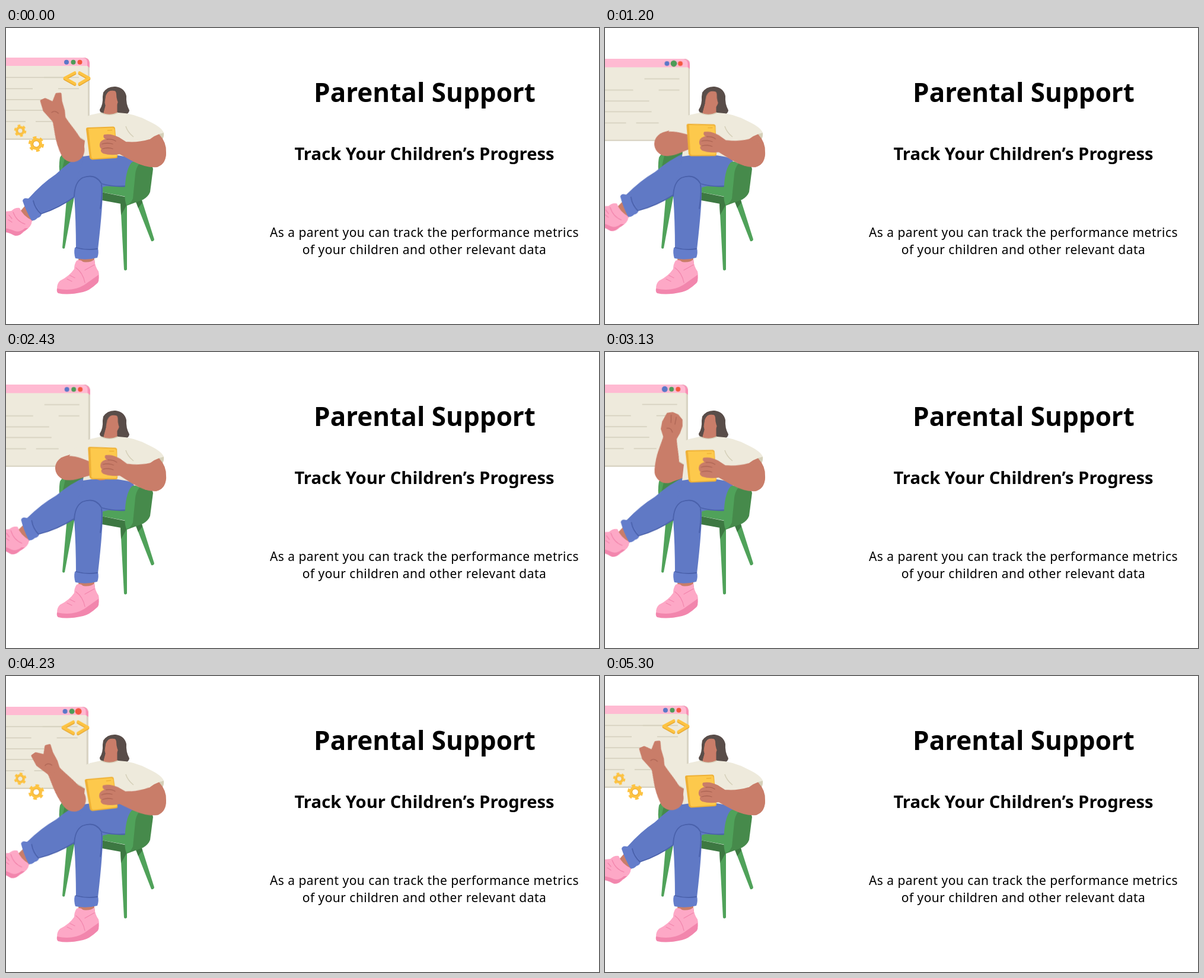
Recreate the animation shown at these times as an HTML page without scripts. Size 1000x500 px, loop 5330 ms.

```html
<!DOCTYPE html>
<html lang="en">
<head>
<meta charset="utf-8">
<title>Parental Support</title>
<style>
  :root { --loop: 5.33s; --sine: cubic-bezier(.37, 0, .63, 1); }
  html, body { margin: 0; width: 100%; height: 100%; overflow: hidden; background: #fff; }
  svg { display: block; width: 100vw; height: 100vh; }

  text { font-family: "Noto Sans", "Open Sans", sans-serif; text-anchor: middle; fill: #000; }
  .title { font-size: 44px; font-weight: 600; }
  .sub { font-size: 29.2px; font-weight: 600; }
  .body { font-size: 21px; letter-spacing: .46px; }

  .skin { fill: #c97d69; stroke: #c97d69; }
  .crease { fill: none; stroke: #ab6353; stroke-width: 1.3; stroke-linecap: round; }
  .jeans { fill: #6079c5; }
  .cuff { fill: #647dcb; }
  .seam { fill: none; stroke: #4a61ab; stroke-width: 1.8; stroke-linecap: round; stroke-linejoin: round; }
  .shoe { fill: #fda8c6; }
  .sole { fill: #f286ad; }
  .lace { fill: none; stroke: #f286ad; stroke-width: 1.3; stroke-linecap: round; }
  .shirt { fill: #eeeadc; }
  .green { fill: #50a25a; }
  .shade { fill: #468a4b; }
  .deep { fill: #3d7842; }
  .rule { fill: none; stroke: #d3cebc; stroke-width: 1.5; }
  .gold { fill: none; stroke: #fdc342; }

  /* floating window */
  .drift { animation: drift 2.665s var(--sine) -1.3325s infinite alternate; }
  .bob { animation: bob 2.665s var(--sine) infinite alternate; }
  @keyframes drift { from { transform: translateX(-2.5px); } to { transform: translateX(2.5px); } }
  @keyframes bob { to { transform: translateY(5.5px); } }

  .dot { transform-box: fill-box; transform-origin: center; animation: pulse 2.665s infinite; }
  .d1 { animation-delay: -2.365s; }
  .d2 { animation-delay: -1.765s; }
  .d3 { animation-delay: -1.465s; }
  @keyframes pulse { 0%, 36%, 100% { transform: scale(1); } 18% { transform: scale(1.38); } }

  .long { animation: long var(--loop) infinite; }
  @keyframes long { 0%, 4%, 78%, 100% { opacity: 1; } 12%, 68% { opacity: 0; } }

  .code { transform-origin: 119.5px 85px; animation: code var(--loop) var(--sine) infinite; }
  @keyframes code {
    0%, 100% { transform: scale(1); }
    13.7%, 16% { transform: scale(1.15, 1.03); }
    23%, 65% { transform: scale(0); }
    72% { transform: scale(1.12); }
    79.4% { transform: scale(1.02); }
  }
  .pop { animation: pop var(--loop) infinite; }
  .early { animation-delay: -.3s; }
  .guest { animation-name: guest; }
  .spin { animation: spin var(--loop) linear infinite; }
  @keyframes pop {
    0%, 10%, 78%, 100% { transform: scale(1); }
    13.7% { transform: scale(.7); }
    18%, 65% { transform: scale(0); }
    73% { transform: scale(1.1); }
  }
  @keyframes guest { 0%, 6%, 22%, 100% { transform: scale(0); } 11%, 17% { transform: scale(1); } }
  @keyframes spin { to { transform: rotate(180deg); } }

  /* body */
  .leg { transform-origin: 150px 250px; animation: swing 1.77667s var(--sine) infinite; }
  @keyframes swing { 50% { transform: rotate(4.6deg); } }

  .elbow, .fore, .hand, .fingers, .hold, .face { animation: var(--loop) ease-in-out infinite; }
  .elbow { animation-name: elbow; }
  .fore { animation-name: fore; }
  .hand { animation-name: hand; }
  .fingers { animation-name: fingers; }
  .hold { animation-name: hold; transform-origin: 252px 214px; }
  .face { animation-name: face; transform-origin: 180px 142px; }
  @keyframes elbow {
    0%, 100% { transform: translate(112px, 206px); }
    13.7% { transform: translate(104px, 195px); }
    26%, 46% { transform: translate(103px, 196px); }
    58.7% { transform: translate(104px, 201px); }
    72%, 79.4% { transform: translate(114px, 208px); }
  }
  @keyframes fore {
    0% { transform: rotate(-23.5deg); animation-timing-function: ease-in; }
    13.7% { transform: rotate(35deg) scaleY(.94); animation-timing-function: ease-out; }
    26% { transform: rotate(92deg) scaleY(.72); }
    46% { transform: rotate(92deg) scaleY(.72); animation-timing-function: ease-in; }
    58.7% { transform: rotate(6deg); animation-timing-function: ease-out; }
    72%, 79.4% { transform: rotate(-35deg) scaleY(1.03); }
    100% { transform: rotate(-23.5deg); }
  }
  @keyframes hand {
    0%, 72%, 100% { d: path("M-9-56L-17-80L-15-97L-8-97L2-86L13-97L19-95L15-83L13-67L9-55Z"); }
    13.7%, 58.7% { d: path("M-9-56L-15-70L-14-82L-8-96L0-98L9-95L16-88L17-78L14-66L9-55Z"); }
  }
  @keyframes fingers { 0%, 72%, 100% { opacity: 0; } 13.7%, 58.7% { opacity: 1; } }
  @keyframes hold {
    0%, 100% { transform: rotate(0deg); }
    13.7% { transform: rotate(-1deg); }
    26%, 46% { transform: rotate(4deg); }
    58.7% { transform: rotate(1deg); }
    72%, 79.4% { transform: rotate(-3deg); }
  }
  @keyframes face {
    0%, 58.7%, 100% { transform: none; }
    13.7%, 46% { transform: translate(1.5px, 1px) rotate(2deg); }
  }
</style>
</head>
<body>
<svg viewBox="0 0 1000 500">
  <defs>
    <g id="gear" class="gold">
      <circle r="7.6" stroke-width="5"/>
      <circle r="11" stroke-width="4.4" stroke-dasharray="5.8 5.72"/>
      <circle r="5.4" stroke="#e5a52f" stroke-width="1"/>
    </g>
  </defs>

  <g class="drift"><g class="bob">
    <path fill="#d9d4c4" d="M-20 50H133Q141 51 141 59V189H-20Z"/>
    <path class="shirt" d="M-20 62H138V186.500H-20Z"/>
    <path fill="#f88fb4" d="M130 50Q140 50 141 59V67L137 64Z"/>
    <path fill="#ffbad2" d="M-20 50H130Q137 51 137 58V64H-20Z"/>
    <circle class="dot d1" cx="102" cy="57.700" r="4" fill="#5a78c8"/>
    <circle class="dot d2" cx="113.500" cy="57.700" r="4" fill="#4c9c58"/>
    <circle class="dot d3" cx="124.500" cy="57.700" r="4" fill="#f4573f"/>
    <path class="rule" d="M64 83.500H123M-5 102.500H45M88 102.500H123M-5 121H72M-5 139H76M-5 158H33M50 158H88"/>
    <path class="rule long" d="M-5 83.500H97"/>
    <g class="code gold" stroke-width="4.600" stroke-linecap="round" stroke-linejoin="round">
      <path stroke="#e5a52f" d="M116 77L99 86L116 95.500M124 77L140 86L124 95.500"/>
      <path d="M116 75.500L99 84.500L116 94M124 75.500L140 84.500L124 94"/>
    </g>
  </g></g>

  <g transform="translate(24 173.500) scale(.78)"><g class="pop early"><use href="#gear" class="spin"/></g></g>
  <g transform="translate(51 196)"><g class="pop"><use href="#gear" class="spin"/></g></g>
  <g transform="translate(-10 125)"><g class="pop guest"><use href="#gear" class="spin"/></g></g>

  <!-- chair -->
  <path class="green" d="M103 280H116L99 372Q96 374 95 371ZM193 294H204V408Q201 411 199 408ZM218 291L228 287L250 357Q249 361 245 360Z"/>
  <path class="deep" d="M193 294H204L203 300L194 316ZM218 291L228 287L230 295L223 304Z"/>
  <path class="shade" d="M91 219Q96 210 112 209H150V245H92Q88 240 91 219Z"/>
  <path class="green" d="M91 219Q94 212 101 211L95 238L90 241Z"/>
  <path class="green" d="M158 264H208V286L160 277Z"/>
  <path class="deep" d="M155 276L205 286V299L156 290Z"/>

  <!-- far upper arm -->
  <g class="elbow"><path class="skin" stroke-width="40" stroke-linecap="round" d="M0 0L24-8"/></g>

  <!-- raised leg -->
  <g class="leg">
    <path class="skin" stroke="none" d="M33 300L48 322L38 331L24 310Z"/>
    <path class="shoe" d="M-12 311L9 309Q15 303 23 304Q28 317 44 325Q43 337 32 342Q24 352 15 351Q8 344-12 341Z"/>
    <path class="sole" d="M-12 337Q4 338 15 343Q23 346 32 338L37 338Q33 343 29 344Q22 353 13 350Q4 344-12 344Z"/>
    <path class="lace" d="M12 311Q18 327 32 331M5 316L10 322M4 324L10 328"/>
    <path class="jeans" d="M134 211Q108 224 84 247Q60 263 38 288L59 314Q90 304 118 284L172 266L180 214Z"/>
    <path class="cuff" d="M28 292Q29 286 37 288Q43 287 46 292L60 313Q60 319 53 321Q49 326 43 325Q34 310 28 292Z"/>
    <path class="seam" d="M46 292Q49 305 59 314Q90 304 117 284"/>
  </g>

  <!-- standing leg -->
  <path class="skin" stroke="none" d="M123 386H148L150 404L122 406Z"/>
  <path class="shoe" d="M119 393Q125 390 130 395Q142 397 149 391Q150 403 156 411Q158 420 155 427L134 443Q105 452 87 446Q84 434 91 427Q107 419 115 407Q115 399 119 393Z"/>
  <path class="sole" d="M86 440Q112 446 132 434L156 417Q158 429 153 432Q140 444 130 446Q104 452 88 448Q85 446 86 440Z"/>
  <path class="lace" d="M118 405Q130 414 133 430M108 418L116 422M103 424L111 428M133 409L149 400"/>
  <path class="jeans" d="M130 213Q165 205 213 217L218 232Q206 245 203 268L163 267Q164 295 155 374H118Q118 325 115 282Q117 255 134 212Z"/>
  <path class="cuff" d="M116 371Q135 376 155 372Q157 380 154 388Q135 393 117 389Q114 380 116 371Z"/>
  <path class="seam" d="M118 371Q136 376 154 373M115 284Q116 260 129 253Q151 245 161 263Q182 269 203 267M161 265Q163 278 159 305"/>

  <!-- chair arm -->
  <path class="shade" d="M212 227L236 229Q248 232 248 238L243 277Q240 285 231 290L204 300L206 250Z"/>
  <path class="green" d="M212 227Q218 223 225 229Q219 236 218 247L214 288Q210 298 203 299Q199 290 201 264Q203 237 212 227Z"/>

  <!-- head and torso -->
  <path fill="#594d49" d="M164 109Q171 98 185 99Q200 101 203 115Q202 128 208 139Q207 147 194 147H172Q158 145 158 138Q164 129 163 116Z"/>
  <path class="skin" stroke="none" d="M169 128H187V144Q188 151 176 151Q164 150 165 143Z"/>
  <g class="face">
    <path class="skin" stroke="none" d="M169 112Q174 104 184 107Q189 112 189 122Q187 134 178 137Q168 136 167 126Z"/>
    <path fill="#594d49" d="M184 101Q170 104 166 121Q164 113 167 107Q176 97 189 102Q196 112 193 132Q186 124 186 111Z"/>
  </g>
  <path fill="#d5d0b9" d="M250 172L266 177Q267 184 263 189L250 190Z"/>
  <path class="skin" stroke-width="4" stroke-linejoin="round" d="M235 192L257 181Q269 194 268 210Q268 228 256 232L236 231Z"/>
  <path class="shirt" d="M160 143Q174 150 189 143Q217 144 242 158Q263 168 266 177Q250 180 237 193L211 194L213 220Q172 209 130 217L133 190Q121 182 106 177Q117 156 142 147Z"/>
  <path fill="none" stroke="#d5d0b9" stroke-width="1.500" d="M106 177Q121 182 133 190M160 143Q174 150 189 143M215 184Q205 176 202 166"/>

  <!-- far forearm -->
  <g class="elbow"><g class="fore">
    <path class="skin" stroke="none" d="M-20 0C-21-26-14-40-10-62H10C12-40 21-24 20 0A20 20 0 0 1-20 0Z"/>
    <path class="hand skin" stroke-width="4" stroke-linejoin="round" d="M-9-56L-17-80L-15-97L-8-97L2-86L13-97L19-95L15-83L13-67L9-55Z"/>
    <path class="crease fingers" d="M-2-95L-1-82M7-92L6-80"/>
    <path class="crease" d="M-7-72Q0-74 3-66"/>
  </g></g>

  <!-- tablet and near forearm -->
  <g class="hold">
    <path fill="#eeb035" d="M135 171Q135 168 138 168L181 166.500Q184 167 184 170L188 217Q188 220 185 220L145 222.500Q142 222 141 219Z"/>
    <path fill="#fdc94c" d="M139 170L180 168.500Q183 169 183 172L187 215Q187 218 184 218L147 220.500Q144 220 144 217Z"/>
    <path fill="none" stroke="#eeb035" stroke-width="1.500" d="M171 173L179 172.500"/>
    <path class="skin" stroke-width="2" stroke-linejoin="round" d="M159 196Q160 190 170 188Q163 184 166 181Q178 179 191 186L202 193Q222 195 242 189Q264 190 269 212Q268 228 255 234Q238 236 214 224L192 212Q177 215 164 211Q159 208 162 204Q158 201 159 196Z"/>
    <path class="crease" d="M162 196Q171 193 180 196M163 204Q172 201 180 204M170 188Q180 187 185 191"/>
  </g>

  <text class="title" x="706" y="125">Parental Support</text>
  <text class="sub" x="705.500" y="222.500">Track Your Children’s Progress</text>
  <text class="body" x="705.500" y="352.500">As a parent you can track the performance metrics</text>
  <text class="body" x="705.500" y="381.500">of your children and other relevant data</text>
</svg>
</body>
</html>
```
